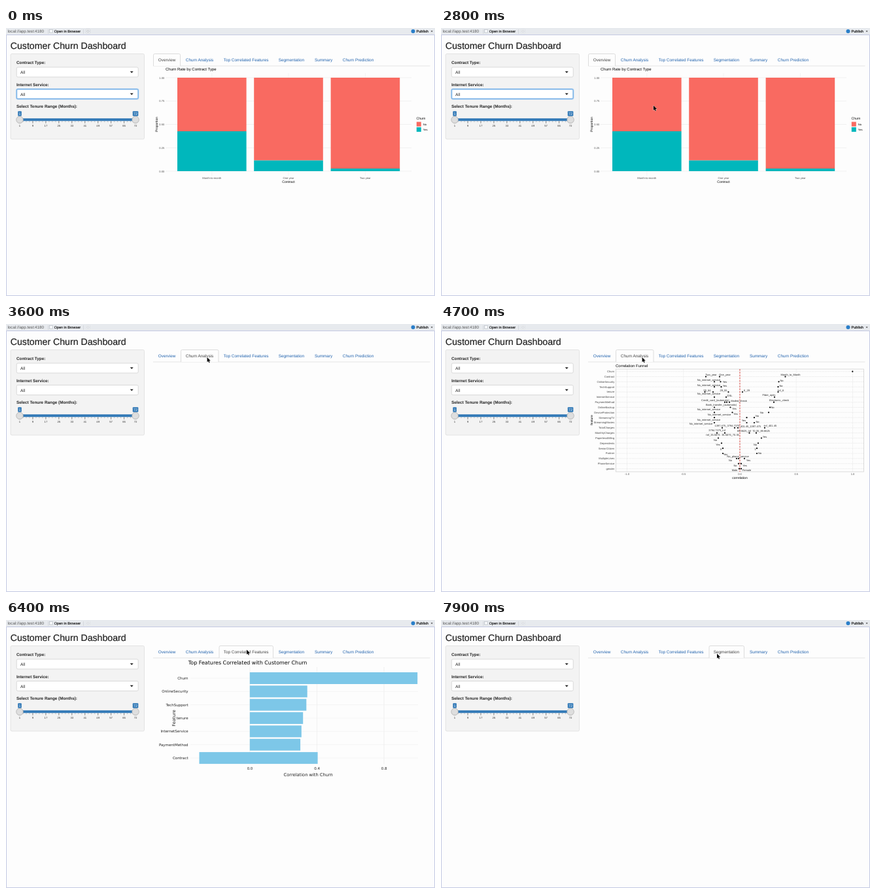
Animation, 656 px wide and 410 px high, one loop 8 s. Source, as an HTML page:

```html
<!DOCTYPE html>
<html lang="en">
<head>
<meta charset="utf-8">
<title>Customer Churn Dashboard</title>
<style>
  html, body { margin: 0; width: 100%; height: 100%; overflow: hidden; background: #fdfdfd; }
  svg { display: block; width: 656px; height: 410px; }
  text { font-family: "Liberation Sans", Arial, sans-serif; text-rendering: geometricPrecision; }
  .wide text { font-family: "DejaVu Sans", Verdana, sans-serif; }
</style>
</head>
<body>
<svg id="stage" viewBox="0 0 656 410"></svg>
<script>
const LOOP = 8000;
const CORAL = '#f96a61', TEAL = '#00b7bc', BLUE = '#337ab7', SKY = '#7dc7e8';

const text = (x, y, s, size, attrs = '') => `<text x="${x}" y="${y}" font-size="${size}" ${attrs}>${s}</text>`;
const rect = (x, y, w, h, fill, attrs = '') => `<rect x="${x}" y="${y}" width="${w}" height="${h}" fill="${fill}" ${attrs}/>`;
const line = (x1, y1, x2, y2, color, attrs = '') => `<path d="M${x1} ${y1}L${x2} ${y2}" stroke="${color}" fill="none" ${attrs}/>`;
const path = (d, attrs) => `<path d="${d}" ${attrs}/>`;
const each = (list, f) => list.map(f).join('');
const MID = 'text-anchor="middle"', END = 'text-anchor="end"';
const upright = (x, y, s, size) => text(0, 0, s, size, `${MID} transform="translate(${x} ${y}) rotate(-90)"`);

// name, left, right, text start
const tabs = [
  ['Overview', 225.5, 266.5, 232.8], ['Churn Analysis', 267.5, 325, 274.8],
  ['Top Correlated Features', 326, 408.5, 332.8], ['Segmentation', 410, 463.5, 416.8],
  ['Summary', 465, 506.5, 472], ['Churn Prediction', 508, 570, 514.8]
];

function toolbar() {
  return rect(0, 0, 656, 10.5, '#e7eaee') +
    path('M.5 10.5H655.5V409.5H.5Z', 'fill="none" stroke="#c3c9e2"') +
    text(2.5, 7, 'local://app.test:4180', 6.2, 'fill="#555"') +
    line(64.5, 2, 64.5, 9, '#c9ccd2', 'stroke-width=".6"') +
    rect(66.5, 2.5, 5, 4.5, '#f8f9fb', 'stroke="#aeb4bd" stroke-width=".6"') +
    text(73.8, 7, 'Open in Browser', 5.4, 'stroke="#000" stroke-width=".12"') +
    line(118.5, 2, 118.5, 9, '#c9ccd2', 'stroke-width=".6"') +
    `<g id="reload">${rect(122.3, 1.8, 6.2, 6.4, '#f4f5f7', 'rx="1" stroke="#c2c6cc" stroke-width=".5"')}
     <circle cx="125.4" cy="5" r="1.6" fill="none" stroke="#9aa1aa" stroke-width=".6"/></g>` +
    '<circle cx="622.5" cy="5" r="3" fill="#2b7fc9"/>' +
    text(627.5, 7, 'Publish', 5.6, 'stroke="#000" stroke-width=".12"') +
    path('M649.6 4.3h3l-1.5 2z', 'fill="#444"');
}

function picker(y, label) {
  return text(16, y - 5, label, 6.35, 'font-weight="bold" fill="#222"') +
    rect(16.2, y, 186, 15, '#fff', 'rx="2" stroke="#ccc" stroke-width=".7"') +
    text(22, y + 10, 'All', 6.4, 'fill="#222"') +
    path(`M189.7 ${y + 6.2}h5l-2.5 2.7z`, 'fill="#222"');
}

function slider() {
  const at = v => 21 + (v - 1) / 71 * 177;
  const marks = [1, 9, 17, 25, 33, 41, 49, 57, 65, 72];
  const minor = Array.from({ length: 36 }, (_, i) => 1 + i * 2);
  return text(16, 122.2, 'Select Tenure Range (Months):', 6.35, 'font-weight="bold" fill="#222"') +
    rect(19, 138.3, 181, 4, BLUE, 'rx="1"') +
    each(minor, v => line(at(v), 142.5, at(v), 144, '#777', 'stroke-width=".5"')) +
    each(marks, v => line(at(v), 142.5, at(v), 146, '#555', 'stroke-width=".6"') +
      text(at(v), 151.4, v, 4.2, `${MID} fill="#333"`)) +
    each([1, 72], v => `<circle cx="${at(v)}" cy="140.4" r="5.3" fill="#dedede" stroke="#aaa" stroke-width=".7"/>` +
      rect(at(v) - (v > 9 ? 4.3 : 2.8), 127.3, v > 9 ? 8.6 : 5.6, 7.5, BLUE, 'rx="1"') +
      text(at(v), 133.3, v, 5.2, `${MID} fill="#fff"`));
}

function sidebar() {
  return text(6.8, 32.3, 'Customer Churn Dashboard', 14.15, 'fill="#222" stroke="#222" stroke-width=".22"') +
    rect(7, 39.5, 204.5, 130.5, '#f3f3f3', 'rx="2" stroke="#dedede" stroke-width=".8"') +
    picker(60, 'Contract Type:') + picker(93.5, 'Internet Service:') +
    `<g id="focus" fill="none">${rect(16.2, 93.5, 186, 15, 'none', 'rx="2" stroke="#b9d7f2" stroke-width="2.4"')}
     ${rect(16.2, 93.5, 186, 15, 'none', 'rx="2" stroke="#66a5e4" stroke-width=".9"')}</g>` +
    slider();
}

function tabBar() {
  return line(225, 58, 648.5, 58, '#ddd', 'stroke-width=".8"') +
    each(tabs, ([name, a, b, x]) =>
      `<g class="tab">${path(`M${a} 58V41.5q0-2 2-2H${b - 2}q2 0 2 2V58`, 'stroke-width=".8"')}
       ${text(x, 51.2, name, 6.36)}</g>`);
}

function overview() {
  const bars = [['Month-to-month', 262, 158], ['One year', 379.2, 202.6], ['Two year', 496.6, 215]];
  const levels = [0, .25, .5, .75, 1];
  return text(244, 65.3, 'Churn Rate by Contract Type', 6) +
    each(levels, v => line(244, 219 - 143 * v, 620, 219 - 143 * v, '#ebebeb', 'stroke-width=".7"') +
      text(242.3, 220.5 - 143 * v, v.toFixed(2), 4.1, `${END} fill="#4d4d4d"`)) +
    each(bars, ([name, x, y]) => line(x + 52.8, 69, x + 52.8, 226, '#f0f0f0', 'stroke-width=".7"') +
      rect(x, 76, 105.6, y - 76, CORAL) + rect(x, y, 105.6, 219 - y, TEAL) +
      text(x + 52.8, 231.2, name, 4.1, `${MID} fill="#4d4d4d"`)) +
    text(432, 237, 'Contract', 5.1, MID) + upright(231.8, 147.5, 'Proportion', 5) +
    text(627.5, 140, 'Churn', 5.1) +
    rect(627.8, 143.6, 7, 7, CORAL) + rect(627.8, 151.8, 7, 7, TEAL) +
    text(637.8, 148.7, 'No', 4.1) + text(637.8, 156.8, 'Yes', 4.1);
}

// feature, dot positions
const funnelRows = [
  ['Churn', 629.3], ['Contract', 405, 426, 526.5], ['OnlineSecurity', 418, 427.5, 516.5],
  ['TechSupport', 418, 428.5, 515.5], ['tenure', 403.5, 416, 439.5, 461, 515.5],
  ['InternetService', 418, 436, 510], ['PaymentMethod', 434, 437, 441, 509],
  ['OnlineBackup', 418, 442.5, 503], ['DeviceProtection', 418, 445.5, 501],
  ['StreamingTV', 418, 467.5, 479], ['StreamingMovies', 418, 467.5, 479],
  ['TotalCharges', 430, 449, 454, 495], ['MonthlyCharges', 422, 434, 471.5, 482],
  ['PaperlessBilling', 424, 490], ['Dependents', 429, 485], ['SeniorCitizen', 431, 483],
  ['Partner', 431, 483], ['MultipleLines', 452, 455, 464], ['PhoneService', 455, 459], ['gender', 456, 459]
];
const NET = 'No_internet_service';
// label, centre, baseline
const funnelTags = [
  ['Two_year', 413, 78.5], ['One_year', 434, 78.5], ['Month_to_Month', 534.5, 78.5],
  [NET, 409.5, 86.8], ['Yes', 434, 89.5], ['No', 521, 88.3],
  [NET, 409.5, 94.5], ['Yes', 434, 96.2], ['No', 520, 95.8],
  ['55_64', 407, 102.5], ['29_55', 432, 102.5], ['6_29', 467.5, 102.5], ['-Inf_6', 519, 102.5],
  [NET, 409.5, 108], ['DSL', 441.5, 110.8], ['Fiber_optic', 501.5, 110.2],
  ['Credit_card_(automatic)', 419.5, 118], ['Mailed_check', 455.5, 118.5], ['Electronic_check', 517, 118],
  ['Bank_transfer_(automatic)', 428.5, 124.6], ['Yes', 448.5, 131], ['No', 507, 129.3],
  [NET, 409.5, 132.3], ['Yes', 450.5, 138.6], ['No', 490.5, 137.2],
  [NET, 425.5, 140.2], ['No', 483.5, 141.8], [NET, 409.5, 148.3], ['Yes', 463, 149.3],
  ['No', 484, 150.8], [NET, 397.5, 154.4],
  ['1397.475_3794.7375', 437.5, 157], ['401.45_1397.475', 473.5, 158], ['-Inf_401.45', 503, 157],
  ['3794.7375_Inf', 422, 163.8], ['89.8625_Inf', 463.5, 165], ['70.35_89.8625', 489.5, 165],
  ['-Inf_35.5875', 415.5, 171.4], ['35.5875_70.35', 442.5, 171.4],
  ['No', 419.5, 178.5], ['Yes', 495, 173.8], ['Yes', 423.5, 186], ['No', 480.5, 186],
  ['0', 428, 192.5], ['1', 480.5, 192.5], ['Yes', 435, 201], ['No', 487.5, 198.8]
];
const lowTags = [
  ['No_phone_service', 454, 203.8], ['No', 442.5, 210], ['Yes', 470, 210],
  ['No', 450, 217.6], ['Yes', 464.5, 217.8], ['Male', 449, 225], ['Female', 467.5, 225]
];

function funnel() {
  const rowY = i => 72.7 + i * 7.83;
  const thin = 'stroke-width=".6" stroke-dasharray="1.5 1"';
  return text(267, 65.5, 'Correlation Funnel', 6) +
    each([-1, -.5, 0, .5, 1], v => line(457 + v * 172.5, 69, 457 + v * 172.5, 226, '#e3e3e3', thin) +
      text(457 + v * 172.5, 231.4, v.toFixed(1), 4.1, `${MID} fill="#4d4d4d"`)) +
    each(funnelRows, ([name], i) => line(267, rowY(i), 646.5, rowY(i), '#dedede', thin) +
      text(265.2, rowY(i) + 1.4, name, 4.1, `${END} fill="#444"`)) +
    rect(267.3, 69, 379.2, 157, 'none', 'stroke="#ccc" stroke-width=".7"') +
    line(457, 69, 457, 226, '#d9372f', 'stroke-width=".9" stroke-dasharray="2.6 1.6"') +
    each(funnelRows, ([, ...dots], i) =>
      each(dots, x => `<circle cx="${x}" cy="${rowY(i)}" r="1.1"/>`)) +
    each([...funnelTags, ...lowTags], ([s, x, y]) => text(x, y, s, 4, `${MID} fill="#222"`)) +
    text(457, 237, 'correlation', 5, MID) + upright(231.8, 147, 'feature', 5);
}

function features() {
  const bars = [['Churn', 629.2], ['OnlineSecurity', 460.7], ['TechSupport', 459.3], ['tenure', 454.2],
    ['InternetService', 451.8], ['PaymentMethod', 450.1], ['Contract', 476.6]];
  const rowY = i => 89 + i * 20.35;
  return '<g class="wide" fill="#222">' +
    each(bars, (_, i) => line(282, rowY(i), 630, rowY(i), '#eee', 'stroke-width=".6"')) +
    each([0, .4, .8], v => line(373 + v * 256.3, 72, 373 + v * 256.3, 220.5, '#ebebeb', 'stroke-width=".6"') +
      text(373 + v * 256.3, 229, v.toFixed(1), 5.5, MID)) +
    each(bars, ([name, end], i) => {
      const x = name === 'Contract' ? 295.5 : 372.8;
      return rect(x, rowY(i) - 9, end - x, 18, SKY) + text(278.6, rowY(i) + 2, name, 5.5, END);
    }) +
    text(278.8, 67.5, 'Top Features Correlated with Customer Churn', 7.97, 'fill="#000"') +
    text(462.2, 239, 'Correlation with Churn', 6.7, MID) + upright(258.8, 150, 'Feature', 6.7) + '</g>';
}

const arrow = path('M0 0V7.3L1.7 5.7L2.8 8.2L4 7.7L2.9 5.2H5.2Z', 'stroke="#fff" stroke-width=".7" paint-order="stroke"');
const hand = path('M-.6 .4q.7-.8 1.4 0V3.2l2.6.5q.9.2.8 1.2L3.6 7.8H-.3L-2.3 5q.1-1 1.7 0Z',
  'fill="#fff" stroke="#000" stroke-width=".75" stroke-linejoin="round"');

const stage = document.getElementById('stage');
stage.innerHTML = rect(0, 0, 656, 410, '#fdfdfd') + toolbar() + sidebar() + tabBar() +
  each([overview, funnel, features], f => `<g class="chart">${f()}</g>`) +
  `<g id="cursor"><g id="arrow">${arrow}</g><g id="hand">${hand}</g></g>`;

const el = id => document.getElementById(id);
const tabEls = [...document.querySelectorAll('.tab')];
const charts = [...document.querySelectorAll('.chart')];
const show = (node, on) => node.setAttribute('visibility', on ? 'visible' : 'hidden');

// time, x, y
const route = [
  [1900, 423, 410], [2400, 345, 205], [2500, 345, 205], [3000, 314, 72], [3100, 314, 72],
  [3200, 311, 56], [3500, 307.6, 51], [5400, 307.6, 51], [5800, 368, 45.5],
  [7300, 368, 45.5], [7700, 422, 51.5], [LOOP, 422, 51.5]
];

function cursorAt(t) {
  const i = Math.max(1, route.findIndex(k => k[0] > t));
  const [a, b] = [route[i - 1], route[i]];
  const p = Math.min(1, Math.max(0, (t - a[0]) / (b[0] - a[0])));
  const e = p * p * (3 - 2 * p);
  return [a[1] + (b[1] - a[1]) * e, a[2] + (b[2] - a[2]) * e];
}

function draw(t) {
  const active = [3600, 6000, 7900].filter(at => t >= at).length;
  const [x, y] = cursorAt(t);
  const over = t < 1900 || y > 58 ? -1 : tabs.findIndex(([, a, b]) => x >= a && x <= b);
  const linked = over >= 0 && over !== active;

  tabEls.forEach((tab, i) => {
    const [box, label] = tab.children;
    box.setAttribute('fill', i === active ? '#fdfdfd' : i === over ? '#e9e9eb' : 'none');
    box.setAttribute('stroke', i === active ? '#d5d5d5' : 'none');
    label.setAttribute('fill', i === active ? '#444' : i === over ? '#1b4f8a' : '#2062ad');
  });
  show(charts[0], t < 3600);
  show(charts[1], t >= 4700 && t < 6000);
  show(charts[2], t >= 6400 && t < 7900);

  el('focus').setAttribute('opacity', Math.min(1, Math.max(0, (3500 - t) / 150)));
  el('reload').setAttribute('opacity', t < 2600 ? 1 : .4);
  el('cursor').setAttribute('transform', `translate(${x} ${y})`);
  show(el('arrow'), t >= 1900 && !linked);
  show(el('hand'), linked);
}

const start = performance.now();
function tick() {
  const t = (performance.now() - start) % LOOP;
  draw(Math.floor(t / 100) * 100);
  requestAnimationFrame(tick);
}
tick();
</script>
</body>
</html>
```
